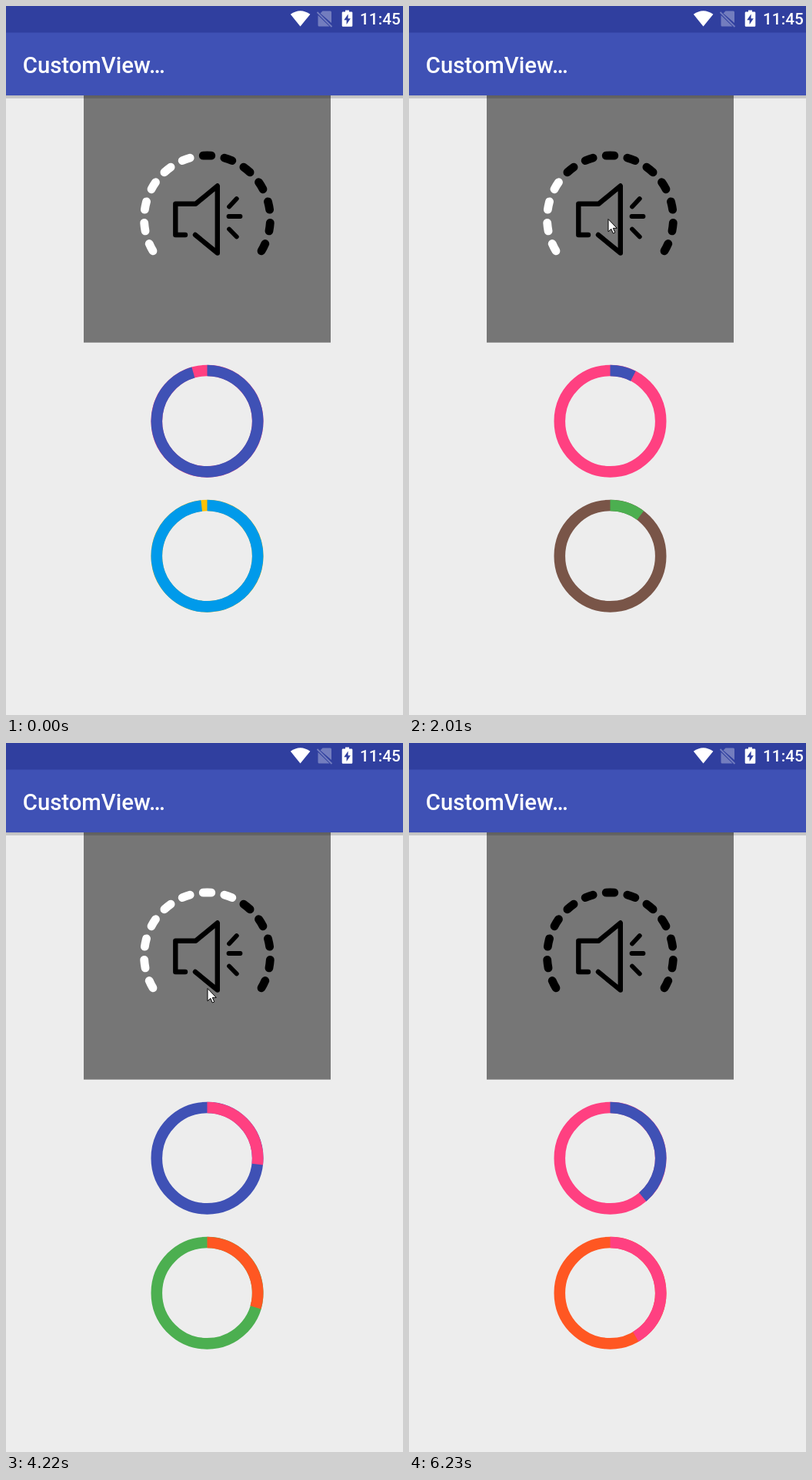
These frames come from a looping animation (516 by 920 pixels, 6330 ms). An HTML page:

```html
<!DOCTYPE html>
<html lang="en">
<head>
<meta charset="utf-8">
<title>CustomView</title>
<style>
html, body { margin: 0; width: 100%; height: 100%; overflow: hidden; background: #ededed; }
svg { display: block; width: 516px; height: 920px; }
text { font-family: Roboto, sans-serif; font-weight: 500; fill: #fff; }
.line { fill: none; stroke: #000; stroke-linecap: round; stroke-linejoin: round; }
.ring { fill: none; stroke-width: 14.6; }
</style>
</head>
<body>
<svg viewBox="0 0 516 920">
  <defs>
    <linearGradient id="shade" x2="0" y2="1">
      <stop stop-opacity=".2"/>
      <stop offset="1" stop-opacity=".14"/>
    </linearGradient>
  </defs>
  <rect width="516" height="920" fill="#ededed"/>
  <rect x="101" y="116" width="321" height="320.7" fill="#767676"/>
  <rect y="116" width="516" height="4" fill="url(#shade)"/>
  <rect width="516" height="116" fill="#3f51b5"/>
  <rect width="516" height="34.5" fill="#303f9f"/>

  <path d="M382.5 26.5 369.8 10.8Q382.5 1.6 395.4 10.8Z" fill="#fff"/>
  <g opacity=".32">
    <path d="M411.5 6.5H421.5Q423 6.5 423 8V22L408.5 9.5ZM405.5 12 420.5 26.5H407Q405.5 26.5 405.5 25Z" fill="#fff"/>
    <path d="M404.5 8 423.5 27" stroke="#fff" stroke-width="1.8"/>
  </g>
  <path d="M441 5.5H446V7.5H449Q450.3 7.5 450.3 8.8V25.5Q450.3 26.8 449 26.8H438Q436.7 26.8 436.7 25.5V8.8Q436.7 7.5 438 7.5H441Z" fill="#fff"/>
  <path d="M444.6 10.5 439.3 18.2H442.6V24L447.8 16.2H444.6Z" fill="#303f9f"/>
  <text x="460" y="24" font-size="20.8">11:45</text>
  <text x="21.8" y="87" font-size="29.3">CustomView…</text>

  <g id="gauge" class="line" stroke-width="10.8"></g>
  <path class="line" stroke-width="6.4" d="M233 297H220.3V256.7H246.5L274.8 233.5V320.5L246 297"/>
  <path class="line" stroke-width="5.8" d="M290 260.5 299.8 250M289.5 273H304.5M290 289.5 299.8 299.5"/>
  <g id="rings"></g>
  <path id="cursor" d="M.5.5V16.8L4.3 13.3 6.8 19 9.3 17.9 6.8 12.3H11.8Z" fill="#fff" stroke="#000"/>
</svg>
<script>
const LOOP = 6330;
const STEPS = 47;       // screen refreshes per loop
const LAG = 20;
const TURN = 26.87;     // degrees per refresh
const CX = 261.5;

// step, lit dashes
const volume = [[0, 6], [6, 6], [7, 9], [9, 9], [13, 3], [15, 4], [19, 12], [23, 0], [26, 0],
  [29, 8], [31, 8], [32, 1], [33, 0]];

// step, pointer position
const pointer = [[1, 506, 330], [2, 382, 297], [4, 257, 300], [6, 252.5, 280], [8, 264, 253],
  [12, 260, 300], [15, 258.5, 276], [19, 260, 225], [23, 257, 350], [25, 257, 326],
  [30, 262, 259], [31, 261.5, 318], [33, 263, 355], [36, 467, 600]];

const $ = id => document.getElementById(id);

function add(parent, tag, attrs) {
  const el = document.createElementNS("http://www.w3.org/2000/svg", tag);
  for (const k in attrs) el.setAttribute(k, attrs[k]);
  return parent.appendChild(el);
}

// Clockwise arc, angles in degrees from the top
function arc(cy, r, from, to) {
  const at = a => {
    const rad = a * Math.PI / 180;
    return (CX + r * Math.sin(rad)).toFixed(2) + " " + (cy - r * Math.cos(rad)).toFixed(2);
  };
  return `M${at(from)}A${r} ${r} 0 ${to - from > 180 ? 1 : 0} 1 ${at(to)}`;
}

function tween(keys, step) {
  const i = keys.findIndex(k => k[0] > step);
  if (i < 0) return keys[keys.length - 1];
  if (i === 0) return keys[0];
  const a = keys[i - 1], b = keys[i];
  const p = (step - a[0]) / (b[0] - a[0]);
  return a.map((v, j) => v + (b[j] - v) * p);
}

const dashes = Array.from({ length: 13 }, (_, i) => {
  const mid = (i - 6) * 19.5;
  return add($("gauge"), "path", { d: arc(276, 82, mid - 3.7, mid + 3.7) });
});

// Each lap paints the next colour over the previous one
function makeRing(cy, colors) {
  const base = add($("rings"), "circle", { class: "ring", cx: CX, cy, r: 65.7 });
  const top = add($("rings"), "path", { class: "ring" });
  return sweep => {
    const lap = Math.floor(sweep / 360);
    base.setAttribute("stroke", colors[lap % colors.length]);
    top.setAttribute("stroke", colors[(lap + 1) % colors.length]);
    top.setAttribute("d", arc(cy, 65.7, 0, sweep % 360));
  };
}

const upper = makeRing(538.7, ["#ff4081", "#3f51b5"]);
const lower = makeRing(713.7, ["#ffc107", "#009aea", "#795548", "#4caf50", "#ff5722", "#ff4081"]);

function draw(time) {
  const step = Math.min(STEPS - 1, Math.floor((time % LOOP + LAG) * STEPS / LOOP));
  const sweep = 344 + step * TURN;
  upper(sweep);
  lower(sweep + 9.6);

  const lit = Math.floor(tween(volume, step)[1]);
  dashes.forEach((d, i) => d.setAttribute("stroke", i < lit ? "#fff" : "#000"));

  const [, x, y] = tween(pointer, step);
  $("cursor").setAttribute("transform", `translate(${x} ${y})`);
  $("cursor").setAttribute("visibility", step >= 1 && step <= 36 ? "visible" : "hidden");
}

const start = performance.now();
function loop() {
  draw(performance.now() - start);
  requestAnimationFrame(loop);
}
loop();
</script>
</body>
</html>
```
